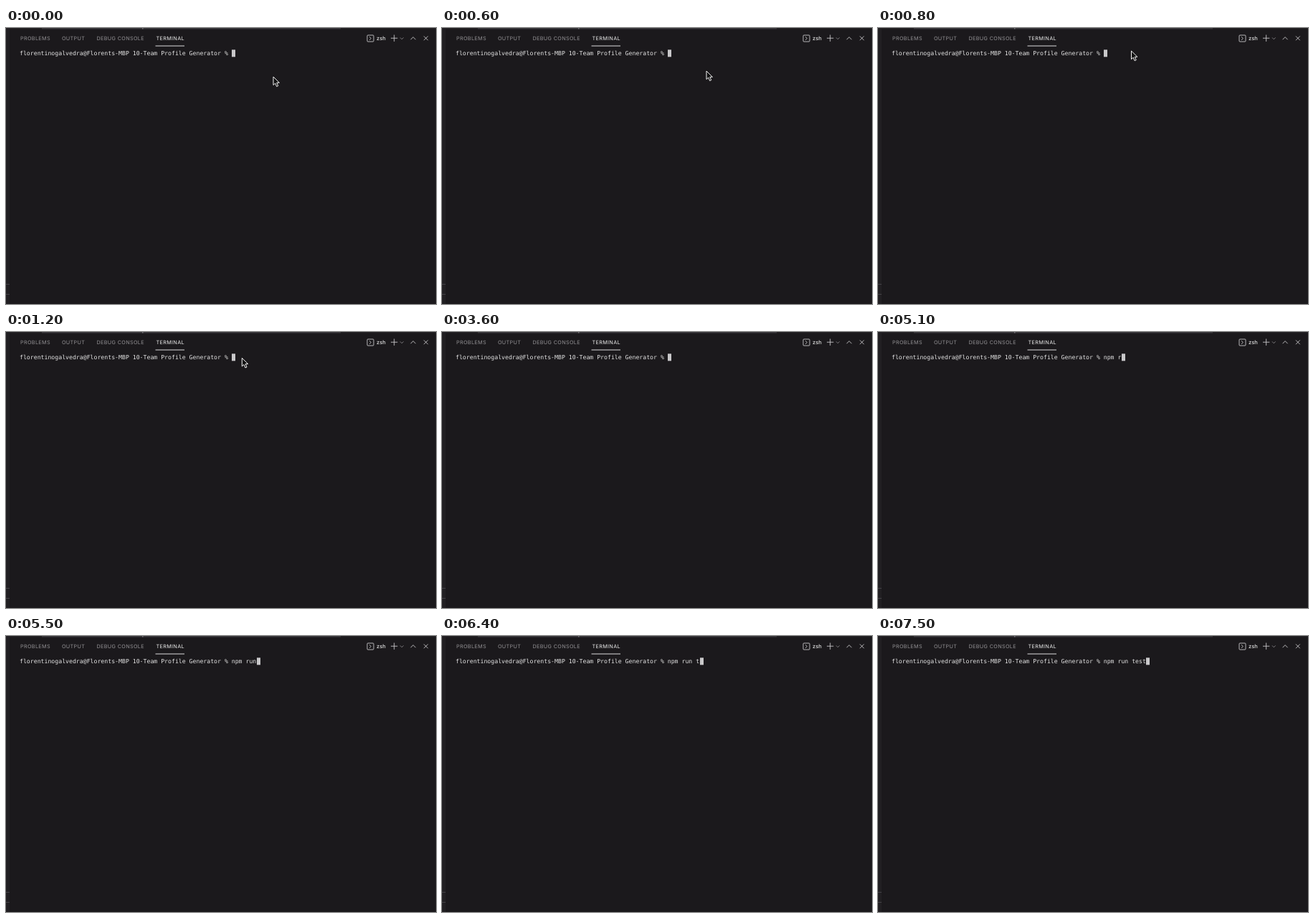
These frames come from a looping animation (600x385 px, 8000 ms). An HTML page:

```html
<!DOCTYPE html>
<html lang="en">
<head>
<meta charset="utf-8">
<title>Terminal</title>
<style>
  html, body { margin: 0; width: 100%; height: 100%; overflow: hidden; background: #1b191c; }
  svg { display: block; width: 600px; height: 385px; }
  text { text-rendering: geometricPrecision; white-space: pre; }
  .tabs { font: 7.25px Inter, sans-serif; letter-spacing: .33px; fill: #929093; }
  .tabs .on { fill: #ececec; }
  .shell { font: 500 7.6px Inter, sans-serif; fill: #dedede; }
  #line { font: 8.2px "DejaVu Sans Mono", monospace; fill: #e4e4e4; }
  .icons { fill: none; stroke: #c8c7c9; stroke-width: .9; }
</style>
</head>
<body>
<svg viewBox="0 0 600 385">
  <rect width="600" height="385" fill="#1b191c"/>
  <rect width="5" height="385" fill="#211f22"/>
  <path d="M0 357.5H5M0 371.5H5" stroke="#444246"/>
  <rect width="600" height="1.5" fill="#232124"/>
  <rect x="50" width="417" height="1.5" fill="#3b393c"/>
  <rect x="190" width="1.5" height="1.5" fill="#77757a"/>

  <g class="tabs">
    <text x="20" y="17.3">PROBLEMS</text>
    <text x="78" y="17.3">OUTPUT</text>
    <text x="126.5" y="17.3">DEBUG CONSOLE</text>
    <text x="209.5" y="17.3" class="on">TERMINAL</text>
  </g>
  <rect x="208.5" y="24.5" width="40.5" height="1" fill="#dedede"/>

  <g class="icons">
    <rect x="504" y="10" width="9" height="9" rx="1"/>
    <path d="M507 12.2l2.4 2.3-2.4 2.3M537 14.2h9.4M541.7 9.5v9.4M564.6 16.2l3.5-3.6 3.5 3.6M583 11.4l5.8 5.8M588.8 11.4l-5.8 5.8"/>
    <path d="M550 13.4l2.3 2.3 2.3-2.3" stroke="#8d8b8f"/>
  </g>
  <text x="517" y="17.2" class="shell">zsh</text>

  <text id="line" x="19" y="38"></text>
  <rect id="caret" y="30.3" width="5" height="10" fill="#c9c8ca"/>
  <path id="mouse" d="M0 0V11.6L2.7 9.1L4.6 13.6L6.7 12.7L4.8 8.3H8.4Z" fill="#111" stroke="#f4f4f4" stroke-width="1" stroke-linejoin="round"/>
</svg>
<script>
  const LOOP = 8000, CELL = 8.2 * 0.602;
  const prompt = "florentinogalvedra@Florents-MBP 10-Team Profile Generator % ";
  const command = "npm run test";
  const keyTimes = [3700, 4500, 4700, 4900, 5100, 5300, 5500, 6100, 6400, 6700, 6900, 7500];
  const hideAt = 3600;
  // time, x, y of the pointer tip
  const path = [
    [0, 373, 68], [100, 372.3, 68], [600, 369, 60], [700, 361, 43], [800, 353.5, 32],
    [900, 346, 30.3], [1000, 338, 31.5], [1100, 332, 34.5], [1200, 329.3, 36.3]
  ];
  const [line, caret, mouse] = ["line", "caret", "mouse"].map(id => document.getElementById(id));

  function draw(now) {
    const t = now % LOOP;
    const typed = keyTimes.filter(k => k <= t).length;
    const text = prompt + command.slice(0, typed);
    if (line.textContent !== text) line.textContent = text;
    caret.setAttribute("x", Math.round(19 + text.length * CELL));

    const [, x, y] = path.filter(p => p[0] <= t).pop();
    mouse.setAttribute("transform", `translate(${x} ${y})`);
    mouse.setAttribute("visibility", t < hideAt ? "visible" : "hidden");
  }

  let start;
  function tick(now) {
    start ??= now;
    draw(now - start);
    requestAnimationFrame(tick);
  }
  draw(0);
  requestAnimationFrame(tick);
</script>
</body>
</html>
```
